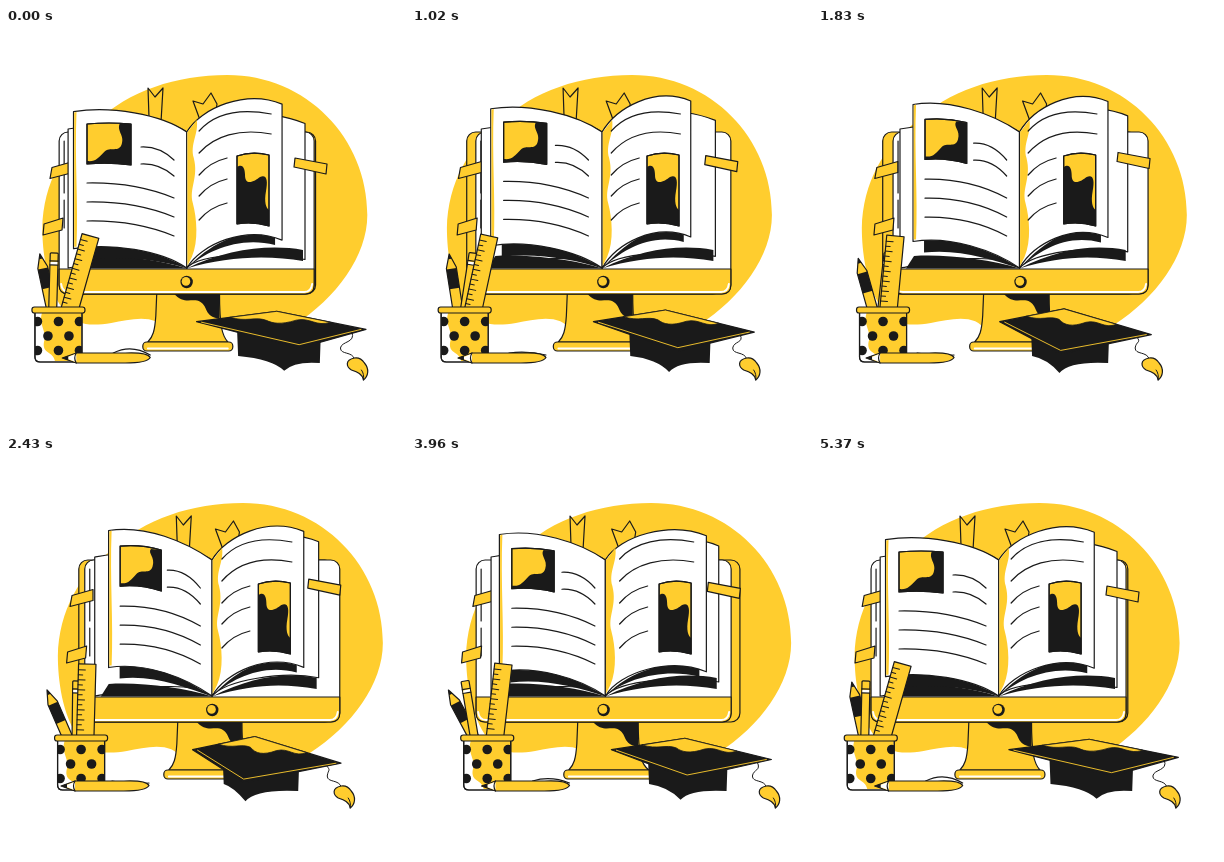
An HTML page for the animation above (5.4 s loop, 400 by 400 pixels).

```html
<!DOCTYPE html>
<html lang="en">
<head>
<meta charset="utf-8">
<style>
html, body { margin: 0; width: 100%; height: 100%; overflow: hidden; background: #fff; }
svg { display: block; width: 100vw; height: 100vh; }
</style>
</head>
<body>
<svg id="stage" viewBox="0 0 400 400" stroke-linejoin="round" stroke-linecap="round"></svg>
<script>
const LOOP = 5400, STEP = 30;
const INK = '#1a1a1a', GOLD = '#ffcd2e', WHITE = '#fff';
const stage = document.getElementById('stage');
let now = 0;

// Swings around mid; reaches mid - amp at time start.
const sway = (mid, amp, start) => mid - amp * Math.cos(2 * Math.PI * (now - start) / LOOP);
const mix = (a, b, k) => a + (b - a) * k;
const lerp = (p, q, k) => [mix(p[0], q[0], k), mix(p[1], q[1], k)];

const path = (d, fill = 'none', stroke = INK, width = 1.2) =>
  `<path d="${d}" fill="${fill}" stroke="${stroke}" stroke-width="${width}"/>`;
const flat = (d, fill) => path(d, fill, 'none');
const poly = (points, fill = GOLD) => path('M' + points.join('L') + 'Z', fill);
const box = (x, y, w, h, r, fill) =>
  `<rect x="${x}" y="${y}" width="${w}" height="${h}" rx="${r}" fill="${fill}" stroke="${INK}" stroke-width="1.2"/>`;
const dot = (x, y, r, fill = INK) => `<circle cx="${x}" cy="${y}" r="${r}" fill="${fill}"/>`;
const shift = (x, y, content) => `<g transform="translate(${x} ${y})">${content}</g>`;

function backdrop() {
  return shift(sway(9.5, 12, 600), 0, flat(`M221 47C300 47 361 110 361 187C361 228 330 270 288 297L160 303
    C150 285 125 291 105 295C85 298 70 298 58 283C40 260 36 222 36 200C37 155 58 118 90 94C122 63 170 47 221 47Z`, GOLD));
}

function stand() {
  const x = sway(11, 11.5, 200), right = sway(225, 11.5, 0);
  return path(`M${x + 151} 264L${x + 150} 288C${x + 149} 303 ${x + 147} 309 ${x + 142} 314H${x + 222}
      C${right + 3} 308 ${right} 300 ${right} 264Z`, GOLD) +
    shift(x, 0, box(137, 314, 90, 9, 4, GOLD) + path('M142 320.5H222', 'none', WHITE, 1.8)) +
    flat(`M${right - 46} 265C${right - 35} 278 ${right - 27} 269 ${right - 19} 274
      C${right - 11} 279 ${right - 16} 288 ${right} 291V265Z`, INK);
}

function monitor() {
  const face = sway(193.3, 13, -200), rim = sway(192.5, 12.5, 500);
  const left = face - 127.5, right = face + 127.5;
  return box(rim - 127.5, 104, 255, 162, 9, GOLD) +
    box(left, 104, 255, 162, 9, WHITE) +
    path(`M${left + 5} 113V165M${left + 5} 172V200`) +
    path(`M${left} 241H${right}V257Q${right} 266 ${right - 9} 266H${left + 9}Q${left} 266 ${left} 257Z`, GOLD) +
    path(`M${left + 2} 256Q${left + 3} 264 ${left + 10} 264H${right - 10}Q${right - 3} 264 ${right - 2} 256`, 'none', WHITE, 2) +
    dot(face, 254, 6.2) + dot(face - .7, 253.4, 4.3, GOLD);
}

function bookmarks() {
  const upper = sway(11, 12, 350), lower = sway(12, 12, -50);
  return shift(sway(14.5, 14.5, 0), 0, poly([[142, 60], [149, 69], [157, 60], [155, 94], [143, 90]])) +
    shift(sway(11.5, 11.5, 0), 0, poly([[187, 73], [197, 76], [205, 65], [211, 76], [208, 95], [194, 92]])) +
    shift(upper, 1.5, poly([[46, 138], [67, 132], [67, 143], [44, 149]])) +
    shift(lower, 0, poly([[38, 196], [57, 190], [56, 202], [37, 207]]));
}

// A sheet hangs from the spine; its lower edge repeats the upper one, lowered by sag.
function leftSheet(x, y, spine, drop) {
  return path(`M${x} ${y}C${x + 37} ${y - 6} ${spine - 26} 86 ${spine} 104V240
    C${spine - 26} 222 ${x + 37} ${y + drop - 6} ${x} ${y + drop}Z`, WHITE);
}
function rightSheet(x, y, spine, drop, sag = 0) {
  return path(`M${spine} 104C${spine + 14} 80 ${x - 36} ${y - 15} ${x} ${y}V${y + drop}
    C${x - 36} ${y + drop - 15 + sag} ${spine + 14} ${216 + sag} ${spine} 240Z`, WHITE);
}
// Dark wedge from the spine out to x; bends are the heights of its two edges near the spine.
function shade(x, top, bottom, spine, rise, reach, bends) {
  const way = Math.sign(spine - x);
  return flat(`M${x} ${top}C${x + way * 34} ${top - rise} ${spine - way * reach} ${bends[0]} ${spine} 240.5
    C${spine - way * reach} ${bends[1]} ${x + way * 34} ${bottom - rise} ${x} ${bottom}Z`, INK);
}

function leftPicture() {
  const x = sway(98, 17, 0), r = sway(140.5, 15.5, 0), y = sway(93, -3, 0);
  const at = k => mix(x, r, k), end = sway(95, -1, 0);
  const frame = `M${x} ${y}Q${at(.5)} ${y - 2} ${r} ${end}V${end + 41}Q${at(.5)} ${y + 38} ${x} ${y + 40}Z`;
  return path(frame, GOLD) +
    flat(`M${r} ${end}L${at(.75)} ${end - 1}C${at(.66)} ${y + 7} ${at(.86)} ${y + 11} ${at(.79)} ${y + 20}
      C${at(.73)} ${y + 29} ${at(.52)} ${y + 22} ${at(.39)} ${y + 28}C${at(.25)} ${y + 34} ${at(.2)} ${y + 38} ${x} ${y + 37}
      V${y + 40}Q${at(.5)} ${y + 38} ${r} ${end + 41}Z`, INK) + path(frame);
}

function rightPicture() {
  const frame = 'M231 128Q246 123 263 127V198Q246 193 231 196Z';
  return shift(sway(11.5, 12, 250), 0, path(frame, GOLD) +
    flat(`M231 139C237 135 239 141 239 147C239 159 249 153 254 149C261 146 262 153 260 163
      C258 174 260 180 263 182V198Q246 193 231 196Z`, INK) + path(frame));
}

function leftText() {
  const x = sway(98, 17, 0), r = sway(181.5, 13.5, 0), lift = sway(-2.5, -2.5, 0);
  const line = (a, y, drop) => path(`M${a} ${y + lift}Q${mix(a, r, .55)} ${y + lift - 1} ${r} ${y + drop}`);
  return line(r - 33, 119, 13) + line(r - 33, 136, 12) +
    [155, 174, 193].map(y => line(x, y, 15)).join('');
}

function rightText() {
  const x = sway(205, 12, 100), r = sway(276.5, 12, 300);
  const long = (y, end) => path(`M${x} ${y}C${x + 15} ${y - 17} ${r - 32} ${end - 6} ${r} ${end}`);
  const short = y => path(`M${x} ${y}Q${x + 11} ${y - 13} ${x + 28} ${y - 17}`);
  return long(103, 86) + long(125, 106) + [147, 168, 192].map(short).join('');
}

function book() {
  const s = sway(193.5, 12.8, -100);
  const left = sway(85.5, 18, 0), leftTop = sway(79, -4.7, 0);
  const left2 = sway(76, 14, 100);
  const right = sway(288, 13, 350), rightTop = sway(76.3, 3.5, 1300);
  const right2 = sway(306, 7, 0), right2Top = sway(90.5, -5, 0);
  const tab = sway(7, 7, -50);
  return leftSheet(left2, 101, s, 139) +
    flat(`M${left2 + 6} 240.5L${left2 + 14} 228C${left2 + 44} 226 ${s - 30} 231 ${s} 240.5Z`, INK) +
    shade(left + 11, leftTop + 135, leftTop + 148, s, 4, 28, [222, 231]) +
    rightSheet(right2, right2Top, s, 136, 8) +
    shade(right2 - 2, 222, 233, s, 6, 40, [221, 228]) +
    shade(right - 7, rightTop + 131, rightTop + 141, s, 9, 20, [218, 222]) +
    shift(tab, -tab / 2, poly([[289, 130], [321, 136], [320, 146], [288, 139]])) +
    leftSheet(left, leftTop, s, 137) +
    flat(`M${left + .7} ${leftTop + 1}L${left + 3} ${leftTop}C${left + 1} ${leftTop + 50} ${left + 5} ${leftTop + 90} ${left + 3} ${leftTop + 135}H${left + .7}Z`, GOLD) +
    rightSheet(right, rightTop, s, 136) +
    flat(`M${s + .6} 104L${s + 10} 92C${s + 12} 106 ${s + 3} 116 ${s + 7} 130C${s + 12} 150 ${s + 2} 160 ${s + 6} 175
      C${s + 10} 190 ${s + 12} 213 ${s + 5} 229L${s + .6} 238Z`, GOLD) +
    leftPicture() + rightPicture() + leftText() + rightText();
}

// Draws a tool along the line from tip to base, as if it stood upright.
function along(tip, base, content) {
  const dx = base[0] - tip[0], dy = base[1] - tip[1];
  const angle = -Math.atan2(dx, dy) * 180 / Math.PI;
  return `<g transform="translate(${tip}) rotate(${angle})">${content(Math.hypot(dx, dy))}</g>`;
}

function tools() {
  const dark = along([sway(37.3, 3.7, -300), sway(230.5, 5.5, 500)], [sway(55, 11, 500), 282], h =>
    path(`M0 0L5 14V${h}H-5V14Z`, GOLD) +
    flat('M0 0L1.8 5H-1.8Z', INK) + flat('M-5 15H5V35H-5Z', INK));
  const light = along([sway(58.7, 12.5, -500), 225], [sway(59, 12.5, 150), 282], h =>
    box(-4, 0, 8, h, 1, GOLD) + flat('M-3.4 9H3.4V12H-3.4Z', WHITE) + path('M-4 8H4M-4 12H4'));
  const ruler = along([sway(84, 7.5, 1400), 208], [sway(73, 13, 650), 282], h => {
    let ticks = '';
    for (let y = 6; y < h - 4; y += 5) ticks += `M-8.7 ${y}h${y % 10 === 6 ? 7 : 4.5}`;
    return box(-8.7, 0, 17.4, h, 0, GOLD) + path(ticks, 'none', INK, 1);
  });
  return dark + light + ruler;
}

function cup() {
  const body = 'M29 284H76V329Q76 334 71 334H34Q29 334 29 329Z';
  let dots = '';
  for (let row = 0; row < 3; row++)
    for (let col = 0; col < 3 - row % 2; col++)
      dots += dot(31.5 + col * 21 + row % 2 * 10.5, 293.5 + row * 14.5, 4.8);
  return shift(sway(12.9, 15.5, 500), 0, path(body, WHITE) +
    flat('M36 285C32 297 42 304 38 314C36 326 47 323 49 333H71Q75.4 333 75.4 329V285Z', GOLD) +
    `<clipPath id="cup"><path d="${body}"/></clipPath><g clip-path="url(#cup)">${dots}</g>` +
    path(body) + box(26, 279, 53, 6, 2.5, GOLD));
}

function pen() {
  const clip = sway(322, 7, 5000);
  return shift(sway(2.5, 12, 1260), 0,
    path(`M106 325Q124 ${clip} 143 327`) +
    path('M55 330L69 325H118Q140 324 143 329.5Q140 335 118 335H69Z', GOLD) +
    flat('M58 330L69 325.7V334.3Z', WHITE) + flat('M55 330L61 327.8V332.2Z', INK) +
    path('M69 325Q66 330 69 335'));
}

function cap() {
  const left = [sway(190, 9.5, 1400), 293.7];
  const top = [sway(261.5, 15.5, 1900), sway(282, 1.4, 2400)];
  const right = [sway(349, 16, 2000), sway(304.2, -3, 2400)];
  const front = [sway(266.5, 29, 2350), sway(323.3, -3.3, 2400)];
  const a = sway(225.5, 12.5, 1750), b = sway(305.5, 14.5, 1950);
  const m = sway(260, 21, 2250), my = sway(344, -1.3, 2400);
  const from = lerp(left, top, .42), to = lerp(top, right, .6);
  const wave = k => mix(from[0], to[0], k);
  const brush = sway(-6.5, 12.5, 1700), knot = right[0] - 14;
  return flat(`M${a} 303L${a + 1} 328Q${m - 12} 331 ${m} ${my}Q${m + 10} 333 ${b - 1} 335L${b} 306Z`, INK) +
    poly([left, top, right, front], INK) +
    path(`M${from}L${top}L${to}C${wave(.86)} ${to[1] + 5} ${wave(.8)} ${to[1] - 5} ${wave(.66)} ${to[1] - 2}
      C${wave(.5)} ${to[1] + 3} ${wave(.42)} ${to[1] + 1} ${wave(.36)} ${from[1] + 3}
      C${wave(.25)} ${from[1] - 1} ${wave(.16)} ${from[1] + 5} ${from}Z`, GOLD, INK, .8) +
    path(`M${left[0] + 5} ${left[1] + .5}L${front[0]} ${front[1] - 3.5}L${right[0] - 5} ${right[1]}`, 'none', GOLD, .9) +
    path(`M${knot} ${right[1] + 3}C${knot + 4} 315 ${brush + 337} 313 ${brush + 336} 320
      C${brush + 336} 327 ${brush + 348} 323 ${brush + 350} 331`, 'none', INK, 1) +
    shift(brush, 0, path(`M350 330C340 332 342 339 347 342C353 344 358 346 359 352
      C364 348 365 341 360 335Q356 329 350 330Z`, GOLD) + path('M359 352Q360 346 357 342', 'none', INK, 1));
}

function update(ms) {
  now = Math.floor(ms % LOOP / STEP) * STEP;
  stage.innerHTML = [backdrop, stand, monitor, bookmarks, book, tools, cup, pen, cap].map(draw => draw()).join('');
}

let start;
function tick(time) {
  start ??= time;
  update(time - start);
  requestAnimationFrame(tick);
}
update(0);
requestAnimationFrame(tick);
</script>
</body>
</html>
```
